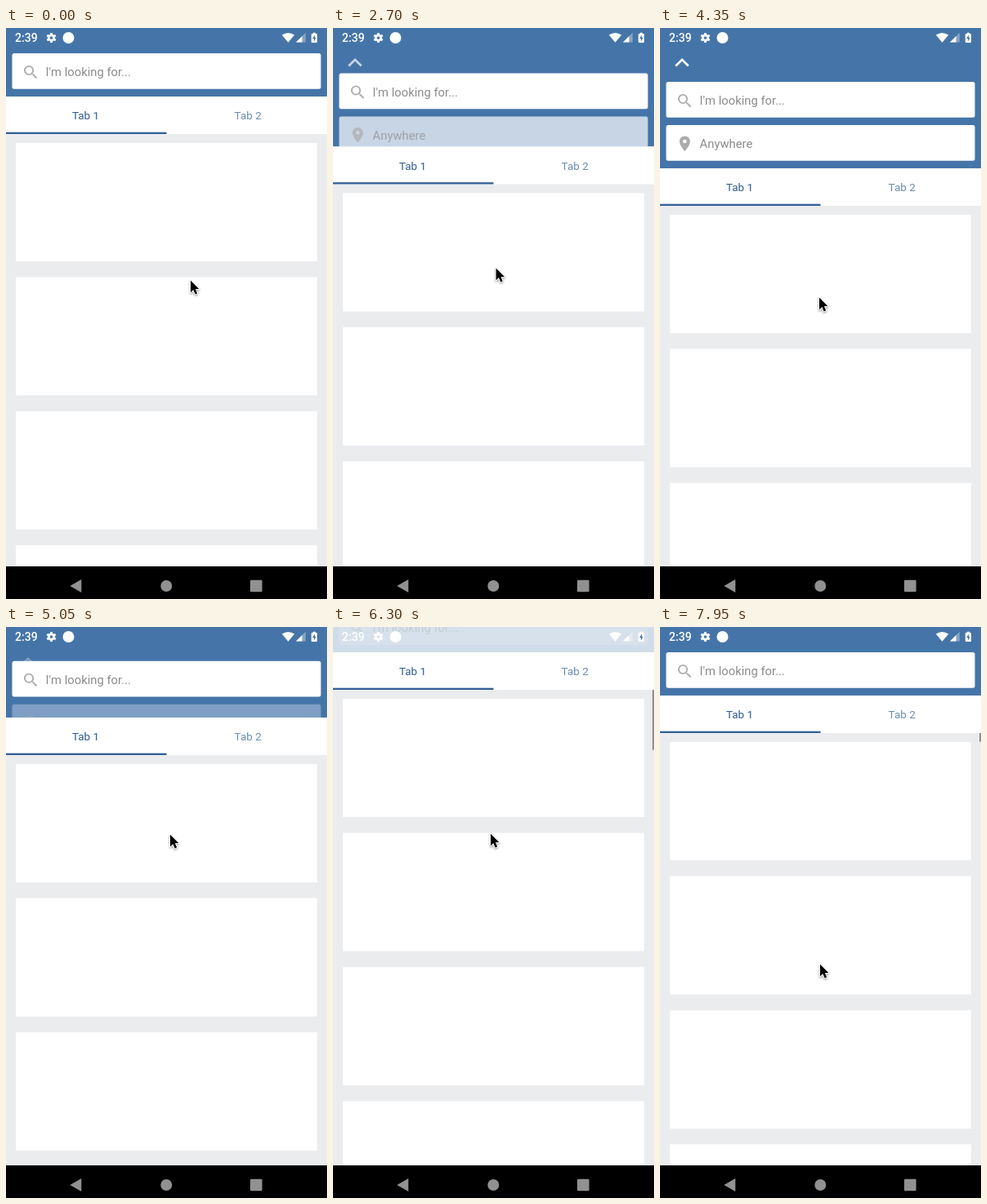
Animation, 393 px wide and 700 px high, one loop 8 s. Source, as an HTML page with a canvas:

```html
<!DOCTYPE html>
<html lang="en">
<head>
<meta charset="utf-8">
<title>Collapsible header</title>
<style>
html, body { margin: 0; width: 100%; height: 100%; overflow: hidden; background: #ebecee; }
canvas { display: block; width: 393px; height: 700px; }
</style>
</head>
<body>
<canvas id="stage"></canvas>
<script>
const W = 393, H = 700, LOOP = 8000, STEP = 50;
const HIDDEN = 31, COLLAPSED = 84, EXPANDED = 172;
const BLUE = '#4575a8', FONT = 'Roboto, sans-serif';

const canvas = document.getElementById('stage');
const c = canvas.getContext('2d');
const dpr = window.devicePixelRatio || 1;
canvas.width = W * dpr;
canvas.height = H * dpr;

// [time, top edge of the tab bar]
const tabKeys = [
  [0, 84], [2050, 84], [2150, 95], [2800, 152], [3200, 169.5], [3300, 169.5],
  [3450, 163.5], [3750, 147], [4150, 172], [4350, 172], [5050, 111],
  [5900, 46], [6150, 31], [6300, 31], [6650, 34], [6750, 34], [7600, 82],
  [7950, 84], [8000, 84]
];
// [time, x, y] of the pointer tip
const pointerKeys = [
  [0, 226, 309], [50, 224, 311], [100, 223, 312], [300, 223, 312], [500, 226, 212],
  [600, 226, 212], [850, 221, 212], [1150, 221, 215], [1850, 207, 217],
  [1950, 207, 217], [2150, 207, 248], [2800, 198, 300], [3200, 192, 317],
  [3300, 192, 317], [3450, 191, 304], [3750, 193, 291], [4150, 195, 332],
  [4200, 195, 332], [4350, 195, 330], [5050, 201, 254], [5900, 195, 198],
  [6150, 193, 253], [6300, 193, 253], [6650, 193, 268], [6750, 193, 268],
  [7600, 196, 390], [7950, 196, 413], [8000, 196, 413]
];

// Monotone cubic interpolation through the keys
function track(keys, t, col = 1) {
  const last = keys.length - 1;
  let i = 0;
  while (i < last - 1 && t >= keys[i + 1][0]) i++;
  const slope = k => (keys[k + 1][col] - keys[k][col]) / (keys[k + 1][0] - keys[k][0]);
  const tangent = k => {
    if (k === 0 || k === last) return 0;
    const a = slope(k - 1), b = slope(k);
    return a * b > 0 ? 2 * a * b / (a + b) : 0;
  };
  const a = keys[i], b = keys[i + 1], d = b[0] - a[0], u = (t - a[0]) / d;
  const u2 = u * u, u3 = u2 * u;
  return (2 * u3 - 3 * u2 + 1) * a[col] + (u3 - 2 * u2 + u) * d * tangent(i)
    + (3 * u2 - 2 * u3) * b[col] + (u3 - u2) * d * tangent(i + 1);
}

const clamp = v => Math.max(0, Math.min(1, v));

function rect(x, y, w, h, color) {
  c.fillStyle = color;
  c.fillRect(x, y, w, h);
}

function poly(points, color) {
  c.beginPath();
  points.forEach(([x, y]) => c.lineTo(x, y));
  c.closePath();
  c.fillStyle = color;
  c.fill();
}

function disc(x, y, r, color) {
  c.beginPath();
  c.arc(x, y, r, 0, Math.PI * 2);
  c.fillStyle = color;
  c.fill();
}

function text(str, x, y, size, color, align = 'left', weight = 400) {
  c.font = `${weight} ${size}px ${FONT}`;
  c.textAlign = align;
  c.fillStyle = color;
  c.fillText(str, x, y);
}

const searchIcon = new Path2D('M15.5 14h-.79l-.28-.27A6.47 6.47 0 0 0 16 9.5 6.5 6.5 0 1 0 9.5 16c1.61 0 3.09-.59 4.23-1.57l.27.28v.79l5 4.99L20.49 19l-4.99-5zm-6 0a4.5 4.5 0 1 1 0-9 4.5 4.5 0 0 1 0 9z');
const pinIcon = new Path2D('M12 2C8.13 2 5 5.13 5 9c0 5.25 7 13 7 13s7-7.75 7-13c0-3.87-3.13-7-7-7zm0 9.5a2.5 2.5 0 1 1 0-5 2.5 2.5 0 0 1 0 5z');

function field(y, label, icon, iconY, boxAlpha, textAlpha) {
  c.globalAlpha = boxAlpha;
  c.beginPath();
  c.roundRect(7.5, y, 378, 43.7, 2.5);
  c.fillStyle = '#fff';
  c.fill();
  c.globalAlpha = textAlpha;
  c.save();
  c.translate(19.2, y + iconY);
  c.scale(0.93, 0.93);
  c.fillStyle = '#acacac';
  c.fill(icon, 'evenodd');
  c.restore();
  text(label, 48.6, y + 28.2, 14.8, '#8b8b8b');
  c.globalAlpha = 1;
}

function header(top) {
  const open = clamp((top - COLLAPSED) / (EXPANDED - COLLAPSED));
  const shown = clamp((top - HIDDEN) / (COLLAPSED - HIDDEN));
  const y = 31 + 35 * open + Math.min(0, top - COLLAPSED);
  const fade = 0.25 + 0.75 * shown;

  c.save();
  c.beginPath();
  c.rect(0, 0, W, top);
  c.clip();
  rect(0, 0, W, top, '#fff');
  c.globalAlpha = fade;
  rect(0, 0, W, top, BLUE);
  c.globalAlpha = open;
  c.lineWidth = 2.7;
  c.strokeStyle = '#fff';
  c.beginPath();
  c.moveTo(19.3, 46.5);
  c.lineTo(27, 38.9);
  c.lineTo(34.7, 46.5);
  c.stroke();
  c.globalAlpha = 1;
  if (open > 0) field(y + 53, 'Anywhere', pinIcon, 11.6, open, open);
  field(y, "I'm looking for...", searchIcon, 12.2, 0.14 + 0.86 * shown, fade);
  c.restore();
}

function tabs(top) {
  rect(0, top, W, 46, '#fff');
  text('Tab 1', 97.5, top + 28.2, 13.5, '#2f5a90', 'center');
  text('Tab 2', 296.2, top + 28.2, 13.5, '#6c8bb0', 'center');
  rect(0, top + 43.7, 196.5, 2.3, '#325f95');
}

function list(top, bar) {
  rect(0, 0, W, 660, '#ebecee');
  for (let i = 0; i < 4; i++) rect(12, top + 57 + 164.4 * i, 369, 145, '#fff');
  if (bar) rect(391, 0, 2, 124 + 0.189 * (EXPANDED - top), '#8d8e90');
}

function statusBar() {
  text('2:39', 11, 17, 14, '#fff', 'left', 500);

  c.strokeStyle = '#fff';
  c.lineWidth = 2.7;
  c.beginPath();
  c.arc(55.5, 12, 3.2, 0, Math.PI * 2);
  c.stroke();
  for (let i = 0; i < 6; i++) {
    const a = i * Math.PI / 3 + Math.PI / 6, x = Math.cos(a), y = Math.sin(a);
    c.beginPath();
    c.moveTo(55.5 + 4 * x, 12 + 4 * y);
    c.lineTo(55.5 + 6 * x, 12 + 6 * y);
    c.stroke();
  }
  disc(76.5, 12, 7, '#fff');

  c.beginPath();
  c.moveTo(345.5, 17.8);
  c.lineTo(337.8, 8.4);
  c.quadraticCurveTo(345.5, 3.4, 353.2, 8.4);
  c.closePath();
  c.fillStyle = '#fff';
  c.fill();

  poly([[355, 17.5], [366.8, 17.5], [366.8, 5.8]], 'rgba(255,255,255,.35)');
  poly([[355, 17.5], [362.5, 17.5], [362.5, 10.1]], '#fff');

  c.beginPath();
  c.roundRect(373.8, 7, 7.2, 11, 1);
  c.rect(375.8, 5.8, 3.2, 1.3);
  c.fillStyle = '#fff';
  c.fill();
  poly([[378, 8.5], [375.2, 13], [377, 13], [377, 16.5], [379.7, 11.8], [378, 11.8]], BLUE);
}

function navBar() {
  rect(0, 660, W, 40, '#000');
  poly([[78.3, 684], [92.3, 676], [92.3, 692]], '#919191');
  disc(196.3, 684, 7, '#919191');
  c.beginPath();
  c.roundRect(299, 676.7, 14.6, 14.6, 1.2);
  c.fillStyle = '#919191';
  c.fill();
}

function pointer(x, y) {
  c.save();
  c.translate(x, y);
  c.beginPath();
  [[0, 0.5], [0, 15.2], [3.4, 12], [5.7, 17.4], [8.2, 16.3], [5.9, 11.1], [10.4, 11]]
    .forEach(p => c.lineTo(...p));
  c.closePath();
  c.lineJoin = 'round';
  c.lineWidth = 2;
  c.strokeStyle = '#fff';
  c.shadowColor = 'rgba(0,0,0,.4)';
  c.shadowBlur = 2.5 * dpr;
  c.shadowOffsetY = 1.2 * dpr;
  c.stroke();
  c.shadowColor = 'transparent';
  c.fillStyle = '#000';
  c.fill();
  c.restore();
}

function draw(t) {
  const top = track(tabKeys, t);
  c.setTransform(dpr, 0, 0, dpr, 0, 0);
  list(top, t >= 2000);
  header(top);
  tabs(top);
  statusBar();
  navBar();
  pointer(track(pointerKeys, t, 1), track(pointerKeys, t, 2));
}

const start = performance.now();
function frame() {
  const t = (performance.now() - start) % LOOP;
  draw(Math.floor(t / STEP) * STEP);
  requestAnimationFrame(frame);
}
frame();
</script>
</body>
</html>
```
